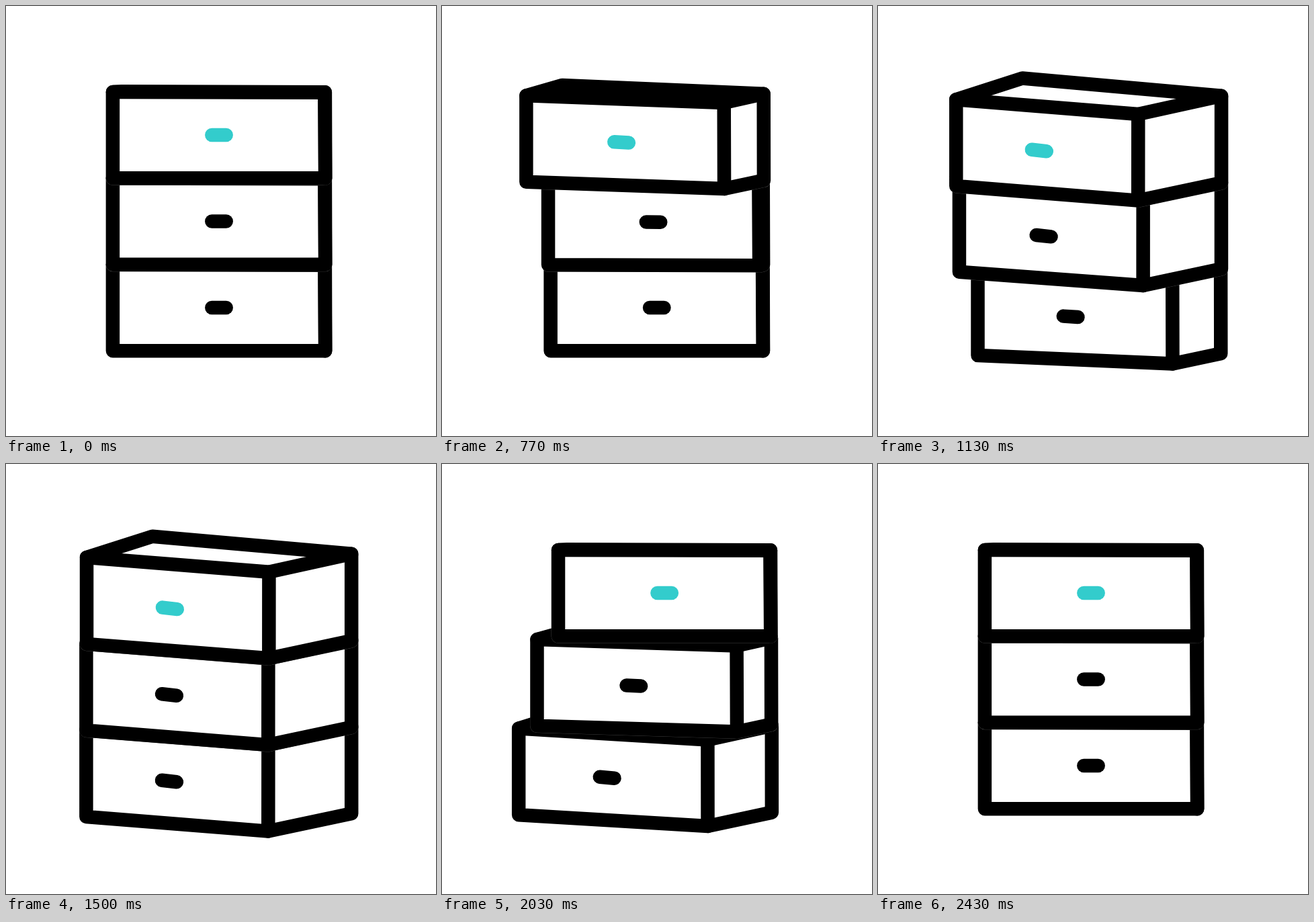
These frames come from a looping animation (640x640 px, 2.5 s). An HTML page with a canvas:

```html
<!DOCTYPE html>
<html lang="en">
<head>
<meta charset="utf-8">
<title>Drawers</title>
<style>
  html, body { margin: 0; width: 100%; height: 100%; overflow: hidden; background: #fff; }
  canvas { display: block; width: 100vw; height: 100vh; }
</style>
</head>
<body>
<canvas id="stage" width="640" height="640"></canvas>
<script>
const ctx = document.getElementById('stage').getContext('2d');
const LOOP = 2500, FPS = 30, LINE = 20.5, SPACING = 128.5;

// Each point: closed x, y, then open x, y. x is measured from the cabinet's right side.
const POINTS = {
  frontLeftTop:     [-316.3, 128, -392.8, 139.2],
  frontRightTop:    [-0.9, 128.7, -121.8, 161],
  backRightTop:     [-0.3, 128.2, 2, 133.8],
  backLeftTop:      [-303, 127.3, -294.2, 107.5],
  frontLeftBottom:  [-316.3, 256.3, -392.8, 268],
  frontRightBottom: [-0.1, 256.3, -121.9, 289.6],
  backRightBottom:  [0.1, 256.3, 2, 263.2],
  handleLeft:       [-168.9, 192, -280.2, 213.8],
  handleRight:      [-147.5, 192, -258.3, 216.3]
};
const OUTLINE = ['frontLeftBottom', 'frontLeftTop', 'backLeftTop',
  'backRightTop', 'backRightBottom', 'frontRightBottom'];

// Timings are [start, span] in steps of 1/30 s, from bottom drawer to top drawer.
const DRAWERS = [
  { row: 2, color: '#000', open: [25.6, 15.2], close: [53.5, 17] },
  { row: 1, color: '#000', open: [21, 15.3], close: [48.6, 17] },
  { row: 0, color: '#3cc', open: [16, 14.5], close: [43.6, 17] }
];
const TURN = { open: [20.2, 16.8], close: [50.8, 17.6] };

const mix = (a, b, p) => a + (b - a) * p;
const ramp = (step, [start, span]) => Math.min(1, Math.max(0, (step - start) / span));
const smooth = s => s * s * (3 - 2 * s);
const accelerate = s => 1 - Math.cos(s * Math.PI / 2);

function trace(points, closed) {
  ctx.beginPath();
  points.forEach(([x, y]) => ctx.lineTo(x, y));
  if (closed) ctx.closePath();
}

function strokePath(color, width) {
  ctx.strokeStyle = color;
  ctx.lineWidth = width;
  ctx.stroke();
}

function drawDrawer(drawer, step, right) {
  const p = smooth(ramp(step, drawer.open)) - accelerate(ramp(step, drawer.close));
  const at = name => {
    const [x0, y0, x1, y1] = POINTS[name];
    return [right + mix(x0, x1, p), mix(y0, y1, p) + drawer.row * SPACING];
  };

  trace(OUTLINE.map(at), true);
  ctx.fillStyle = '#fff';
  ctx.fill();
  strokePath('rgba(255,255,255,0.35)', LINE + 0.5); // faint seam over the drawer below
  strokePath('#000', LINE);

  trace(['frontLeftTop', 'frontRightTop', 'backRightTop'].map(at));
  strokePath('#000', LINE);
  trace(['frontRightTop', 'frontRightBottom'].map(at));
  strokePath('#000', LINE);
  trace(['handleLeft', 'handleRight'].map(at));
  strokePath(drawer.color, LINE);
}

function render(time) {
  const step = Math.floor(time % LOOP * FPS / 1000 + 0.15);
  const turn = smooth(ramp(step, TURN.open)) - smooth(ramp(step, TURN.close));
  const right = mix(475.2, 512.2, turn);
  ctx.fillStyle = '#fff';
  ctx.fillRect(0, 0, 640, 640);
  ctx.lineJoin = ctx.lineCap = 'round';
  DRAWERS.forEach(drawer => drawDrawer(drawer, step, right));
}

const begin = performance.now();
function tick() {
  render(performance.now() - begin);
  requestAnimationFrame(tick);
}
tick();
</script>
</body>
</html>
```
